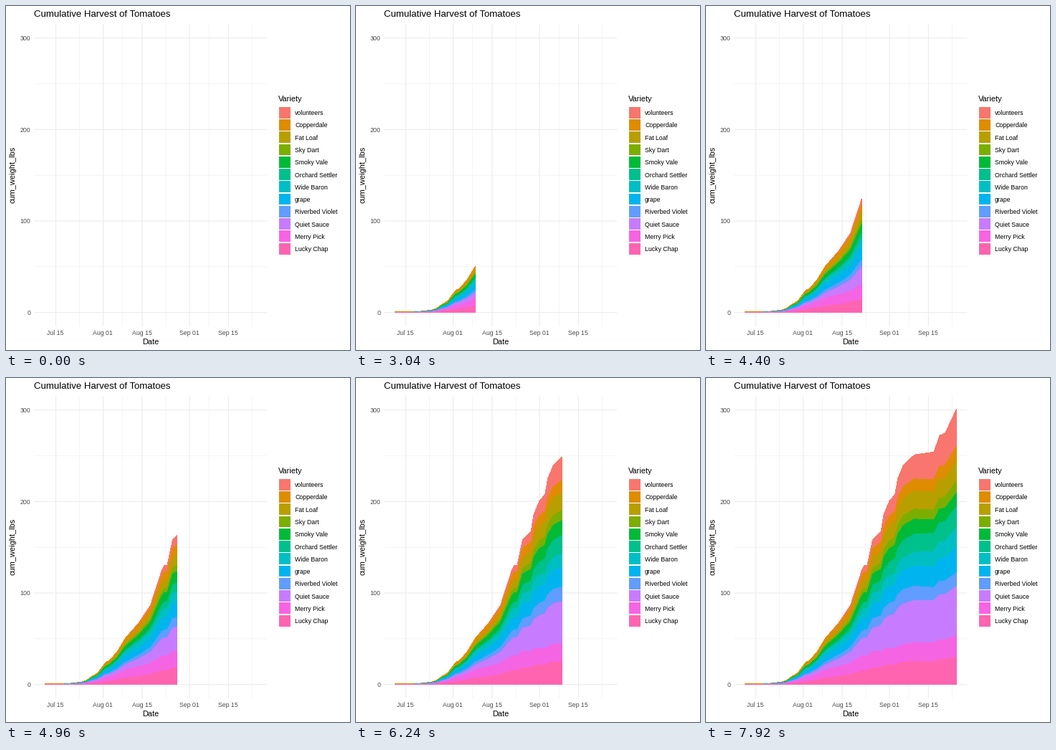
A matplotlib script for the animation above (8000 ms loop, 480 px wide and 480 px high).

```python
import math

import numpy as np
import matplotlib.pyplot as plt
from matplotlib.animation import FuncAnimation
from matplotlib.patches import Polygon, Rectangle

FRAMES, INTERVAL = 100, 80
LAST_DAY = 76
plt.rcParams["font.family"] = "Liberation Sans"

# Name, colour, and share of the harvest in percent on the share days
SHARE_DAYS = (29, 55, 76)
VARIETIES = [
    ("volunteers", "#F8766D", (0, 9.3, 13.5)),
    ("Copperdale", "#DE8C00", (9.5, 5.3, 5.3)),
    ("Fat Loaf", "#B79F00", (5, 8, 7.3)),
    ("Sky Dart", "#7CAE00", (3, 4.4, 4.3)),
    ("Smoky Vale", "#00BA38", (9, 7.1, 5)),
    ("Orchard Settler", "#00C08B", (2, 8, 7.7)),
    ("Wide Baron", "#00BFC4", (10, 5.8, 7)),
    ("grape", "#00B4F0", (13, 8.4, 9.3)),
    ("Riverbed Violet", "#619CFF", (6, 6.7, 5)),
    ("Quiet Sauce", "#C77CFF", (11, 18.7, 17.8)),
    ("Merry Pick", "#F564E3", (17.8, 8, 7.8)),
    ("Lucky Chap", "#FF64B0", (13.9, 10.2, 10)),
]

# Key points of the running total: day since July 11, pounds
TOTAL = [
    (0, 0.6), (7, 0.6), (13, 2.5), (15, 4.2), (17, 9), (19, 12.3),
    (22, 24.5), (23, 25.5), (26, 35.3), (29, 50.5), (34, 68), (38, 86.5),
    (42, 124), (43, 130), (44, 130), (46, 158.5), (49, 167.5), (50, 186),
    (52, 200.5), (54, 207.5), (55, 225), (57, 239.5), (61, 251),
    (68, 254), (70, 272), (72, 274.5), (76, 300.5),
]
days, total = np.array(TOTAL, float).T


def px(day):
    return 54 + 3.885 * day


def py(pounds):
    return 427.7 - 1.277 * pounds


def layer_edges():
    """Upper edge of every layer on the key days, top layer first."""
    shares = np.array([np.interp(days, SHARE_DAYS, share)
                       for _, _, share in VARIETIES])
    stacked = np.cumsum(shares[::-1], axis=0)[::-1]
    return total * stacked / stacked[0]


fig = plt.figure(figsize=(4.8, 4.8), dpi=100, facecolor="white")
ax = fig.add_axes([0, 0, 1, 1])
ax.set_xlim(0, 480)
ax.set_ylim(480, 0)
ax.axis("off")


def label(x, y, text, size, color="black", **kw):
    ax.text(x, y, text, fontsize=size * 0.72, color=color,
            va="baseline", **kw)


def grid(xs, ys, width):
    style = dict(color="#EBEBEB", lw=width * 0.72, zorder=1,
                 solid_capstyle="butt", snap=False)
    for x in xs:
        ax.plot([x, x], [24.8, 447], **style)
    for y in ys:
        ax.plot([39.2, 364.2], [y, y], **style)


date_ticks = {4: "Jul 15", 21: "Aug 01", 35: "Aug 15",
              52: "Sep 01", 66: "Sep 15"}
weight_ticks = range(0, 301, 100)
grid([px(d) for d in (12.5, 28, 43.5, 59, 74.5)],
     [py(v) for v in range(50, 251, 100)], 0.53)
grid([px(d) for d in date_ticks], [py(v) for v in weight_ticks], 1.07)

for day, name in date_ticks.items():
    label(px(day) - 0.5, 459, name, 8.8, "#4D4D4D", ha="center")
for v in weight_ticks:
    label(34.3, py(v) + 3.2, str(v), 8.8, "#4D4D4D", ha="right")

label(39, 15, "Cumulative Harvest of Tomatoes", 13.2)
label(201.7, 472, "Date", 11, ha="center")
label(13, 235.5, "cum_weight_lbs", 11, ha="center", rotation=90,
      rotation_mode="anchor")

# Legend swatches sit on whole pixels
label(380, 133, "Variety", 11)
for i, (name, color, _) in enumerate(VARIETIES):
    step = 17.28 * i
    top, bottom = math.floor(141.18 + step), math.floor(157.02 + step)
    ax.add_patch(Rectangle((381, top), 16, bottom - top, fc=color, lw=0))
    label(403, 152.2 + step, name, 8.8)

# Each layer reaches the baseline; lower layers cover the ones above
edges = layer_edges()
layers = []
for i, (_, color, _) in enumerate(VARIETIES):
    poly = Polygon(np.zeros((3, 2)), fc=color, lw=0, antialiased=False,
                   snap=False, zorder=3 + 0.01 * i)
    layers.append(ax.add_patch(poly))

# Every key day falls on a whole frame; the reveal is linear in between
day_frames = np.round(days * (FRAMES - 1) / LAST_DAY)


def update(frame):
    now = np.interp(frame, day_frames, days)
    seen = np.append(days[days < now], now)
    x = px(np.concatenate([seen, [now, 0]]))
    for poly, edge in zip(layers, edges):
        height = np.append(np.interp(seen, days, edge), [0, 0])
        poly.set_xy(np.column_stack([x, py(height)]))
        poly.set_visible(frame > 0)
    return layers


anim = FuncAnimation(fig, update, frames=FRAMES, interval=INTERVAL,
                     repeat=True, repeat_delay=0, blit=False)
plt.show()
```
